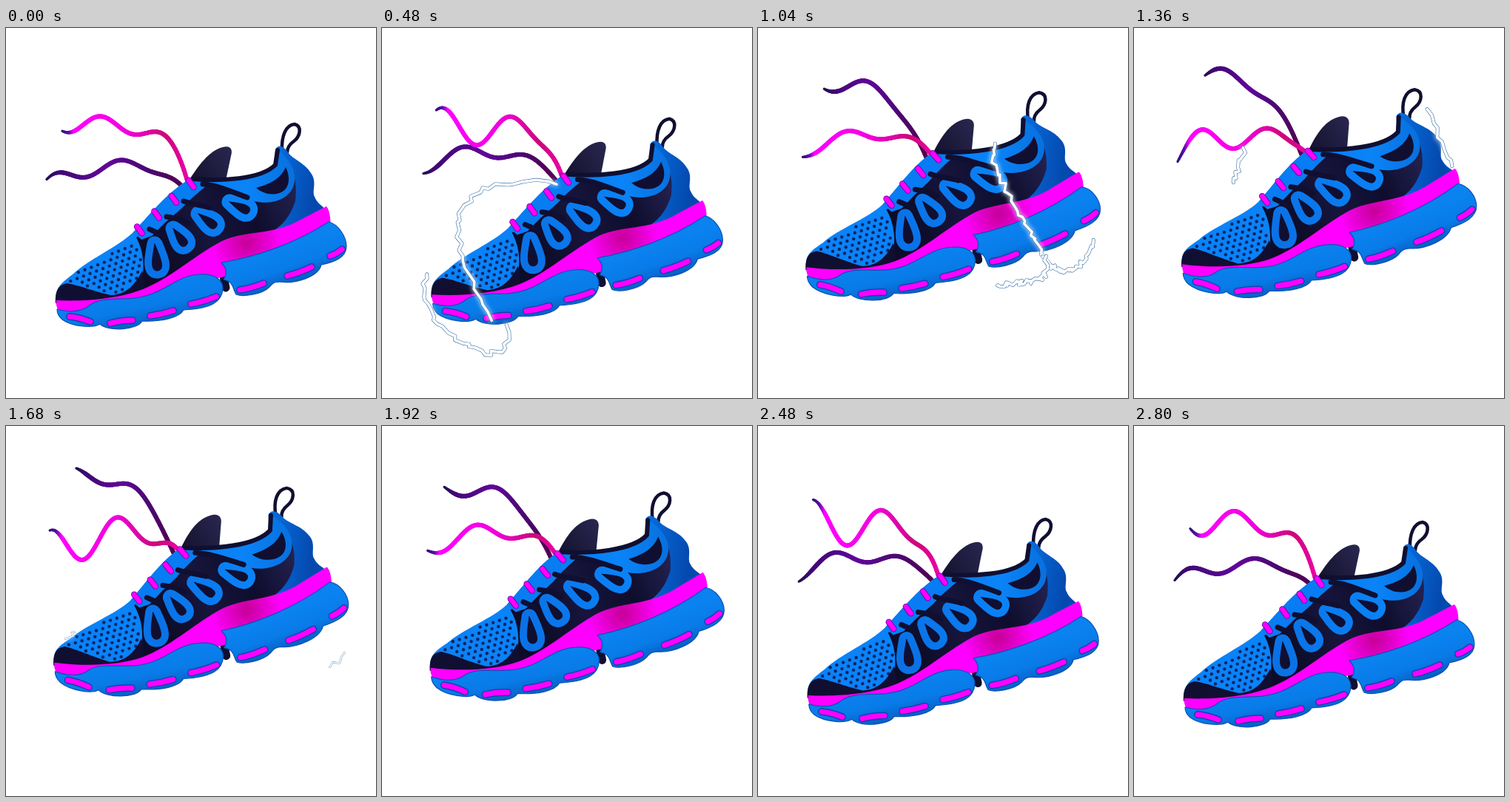
An HTML page with a canvas for the animation above (2880 ms loop, 500 by 500 pixels).

```html
<!DOCTYPE html>
<html lang="en">
<head>
<meta charset="utf-8">
<title>Sneaker</title>
<style>
  html, body { margin: 0; height: 100%; overflow: hidden; background: #fff; }
  canvas { display: block; }
</style>
</head>
<body>
<canvas id="stage" width="500" height="500"></canvas>
<script>
const ctx = document.getElementById('stage').getContext('2d');
const LOOP = 2880, STEP = 80, TAU = Math.PI * 2;
const NAVY = '#100f31', BLUE = '#087cf2', PINK = '#ff00ff';
ctx.lineCap = ctx.lineJoin = 'round';

let lift = 0;

// The shoe rises, leans back at the top and flexes at both ends.
function warp(x, y) {
  const lean = Math.max(0, (350 - y) / 190) ** 2 * (1 - Math.abs(x - 250) / 260);
  return [
    x + lift * (0.015 * (x - 250) - 21 * lean),
    y - lift * (40 + 12 * ((x - 240) / 200) ** 2)
  ];
}
const shape = d => new Path2D(d.replace(/([\d.]+),([\d.]+)/g, (_, x, y) => warp(+x, +y).join()));

function gradient(x0, y0, x1, y1, ...colors) {
  const g = ctx.createLinearGradient(...warp(x0, y0), ...warp(x1, y1));
  colors.forEach((c, i) => g.addColorStop(i / (colors.length - 1), c));
  return g;
}
function fill(d, color) {
  ctx.fillStyle = color;
  ctx.fill(shape(d));
}
function line(d, color, width) {
  ctx.strokeStyle = color;
  ctx.lineWidth = width;
  ctx.stroke(shape(d));
}

// A wave runs along the lace towards its tip, three lengths per loop.
function lace({ end, tipX, base, tilt, size, power, crest, stops }, theta) {
  const [ex, ey] = warp(...end);
  const g = ctx.createLinearGradient(tipX, 0, ex, 0);
  stops.forEach(([at, color]) => g.addColorStop(at, color));
  ctx.strokeStyle = g;
  let last;
  for (let i = 0; i <= 90; i++) {
    const u = i / 90, x = tipX + (ex - tipX) * u;
    const wave = size * (1 - u * u) * Math.cos(TAU * (x - crest) / 95 + 3 * theta);
    const y = base + tilt * (1 - u) ** 4 + (ey - base) * u ** power - wave;
    if (last) {
      ctx.lineWidth = 3 + 3 * Math.min(1, u * 9);
      ctx.beginPath();
      ctx.moveTo(...last);
      ctx.lineTo(x, y);
      ctx.stroke();
    }
    last = [x, y];
  }
}
function laces(theta) {
  lace({
    end: [238, 214], tipX: 55 + 41 * lift ** 2, base: 184 - 119 * lift,
    tilt: 30 * (1 - lift) ** 2, size: 11, power: 6 - 3 * lift, crest: 158,
    stops: [[0, '#22104f'], [0.08, '#3f0873'], [0.45, '#60069a'], [0.75, '#4a0870'], [1, '#54004f']]
  }, theta);
  lace({
    end: [246, 210], tipX: 76 - 17 * lift, base: 134 + 10 * lift,
    tilt: 36 * lift - 8, size: 20 + 12 * Math.cos(3 * theta - 4.2), power: 8, crest: 129,
    stops: [[0, '#32107a'], [0.05, '#5a0caa'], [0.09, PINK], [0.5, '#f200e0'], [0.82, '#cc0878'], [1, '#ec00a8']]
  }, theta);
}

// Navy teardrop with a blue rim, from its point to its round end
function drop(x, y, ex, ey, width) {
  const dx = ex - x, dy = ey - y, k = width / Math.hypot(dx, dy);
  const side = (p, s) => [x + dx * p - s * dy * k, y + dy * p + s * dx * k].join();
  const d = `M${x},${y} C${side(0.5, 0.5)} ${side(1, 1)} ${ex},${ey} C${side(1, -1)} ${side(0.5, -0.5)} ${x},${y}Z`;
  line(d, gradient(200, 300, 340, 220, '#0a72e6', '#0a84f8'), 21);
  fill(d, NAVY);
  line(d, NAVY, 1);
}

function dots() {
  const mesh = shape('M80,344 C105,320 150,302 174,287 C183,300 184,318 178,338 C168,352 152,359 138,358 C118,353 98,346 80,344Z');
  ctx.fillStyle = '#0b2560';
  for (let row = -8; row < 9; row++) {
    for (let col = -9; col < 10; col++) {
      const a = (col + (row & 1) / 2) * 9.4, b = row * 7.2;
      const [x, y] = warp(138 + a * 0.93 + b * 0.36, 330 - a * 0.36 + b * 0.93);
      if (!ctx.isPointInPath(mesh, x, y)) continue;
      ctx.beginPath();
      ctx.arc(x, y, 2.2, 0, TAU);
      ctx.fill();
    }
  }
}

function upper() {
  fill('M68,372 C65,352 73,346 90,333 C112,312 150,297 172,276 C196,250 222,218 252,202 C290,208 345,206 363,184 L364,164 C368,156 376,160 381,168 C388,178 404,182 412,196 C421,208 413,220 417,228 C421,238 428,240 432,246 L300,330 L180,372Z',
    gradient(240, 230, 410, 260, '#0a82f8', BLUE, '#0449ae'));
  fill('M176,283 C184,280 190,268 200,262 L232,232 L262,206 C300,214 350,212 366,190 L370,170 C386,182 395,206 391,234 C384,256 372,268 358,276 C330,278 300,282 285,292 C258,308 235,325 215,340 L180,358 C188,330 188,305 176,283Z',
    gradient(210, 300, 390, 220, '#0d0c28', '#17153c', '#0e0d2d', '#23214f'));
  fill('M172,276 C196,250 222,218 252,202 L278,207 C264,219 250,230 237,244 L215,263 L197,281 L183,286Z', BLUE);
  fill('M252,204 C300,212 345,206 366,186 L369,166 C388,182 394,200 388,215 C380,234 355,239 335,234 C315,228 300,216 262,208Z',
    gradient(260, 210, 390, 210, BLUE, '#0a84f8', '#0870de'));
  fill('M338,216 C360,210 372,202 378,188 C386,205 382,221 366,224 C354,226 345,222 338,216Z', NAVY);
  line('M253,204 C290,207 344,205 364,185 L367,165', NAVY, 6);

  drop(201, 292, 205, 328, 11);
  drop(226, 271, 243, 294, 10);
  drop(260, 251, 284, 269, 10);
  drop(302, 235, 329, 248, 10);
  line('M266,211 C284,212 302,220 326,229', NAVY, 7);
  line('M240,234 C250,238 262,239 276,243', NAVY, 7);
  line('M217,255 C227,256 237,259 246,264', NAVY, 7);
  line('M194,272 C201,275 207,277 213,282', NAVY, 7);

  dots();
  fill('M67,372 C66,354 72,347 82,345 C98,347 118,356 142,361 C162,360 174,348 184,328 C188,340 187,350 184,358 L110,374Z', NAVY);
}

function sole() {
  line('M293,330 L297,351', NAVY, 11);
  const pink = ctx.createRadialGradient(...warp(325, 290), 2, ...warp(325, 290), 48);
  pink.addColorStop(0, '#c9009b');
  pink.addColorStop(1, PINK);
  fill('M68,368 C110,370 155,365 185,353 C222,338 250,311 288,290 C320,272 360,282 400,258 L433,241 Q440,250 438,275 L300,335 L286,338 L110,392 Q65,394 68,368Z', pink);

  const edge = '#0a50b6', shades = ['#0a82f0', '#087be8', '#0757bb'];
  const front = 'M69,380 C88,385 104,383 114,374 C136,360 166,372 198,359 C220,351 236,334 262,333 C282,332 293,340 293,352 C292,370 278,379 240,381 C234,392 210,397 184,396 C178,408 138,411 127,400 C118,406 90,404 76,394 Q69,388 69,380Z';
  fill(front, gradient(200, 345, 212, 402, ...shades));
  line(front, edge, 1.2);
  const heel = 'M291,317 C335,310 390,292 436,262 C449,265 460,282 460,295 C460,310 444,316 426,320 C422,336 392,346 371,343 C362,343 360,345 356,350 C346,360 320,364 311,360 C306,352 308,343 294,340 Q302,328 291,317Z';
  fill(heel, gradient(375, 298, 392, 348, ...shades));
  line(heel, edge, 1.2);
  [
    'M86,390 Q99,391 114,397', 'M141,399 Q156,395 171,395', 'M195,389 Q210,387 226,382',
    'M250,373 Q267,370 284,363', 'M316,354 Q331,352 348,345', 'M380,335 Q396,331 413,323',
    'M438,308 Q447,305 454,299'
  ].forEach(d => {
    line(d, '#0646ad', 10);
    line(d, PINK, 7.2);
  });
}

function eyelets() {
  for (let i = 0; i < 4; i++) {
    const x = 247 - 23.3 * i, y = 206 + 20.8 * i;
    const d = `M${x},${y} L${x + 6.5},${y + 9}`;
    line(d, '#6a0ba8', 8.5);
    line(d, PINK, 6.5);
  }
}

let seed = 5;
const jitter = () => (seed = seed * 16807 % 2147483647) / 2147483647 * 8 - 4;

// A jagged stroke along the cubic curve through four control points
function bolt(start, span, ...controls) {
  const points = [];
  let length = 0;
  for (let i = 0; i <= 30; i++) {
    const u = i / 30, v = 1 - u;
    const weights = [v ** 3, 3 * v * v * u, 3 * v * u * u, u ** 3];
    const at = axis => weights.reduce((sum, w, k) => sum + w * controls[k * 2 + axis], jitter());
    points.push([at(0), at(1)]);
    if (i) length += Math.hypot(points[i][0] - points[i - 1][0], points[i][1] - points[i - 1][1]);
  }
  return { start, span, length, path: new Path2D('M' + points.join('L')) };
}
const bolts = [
  bolt(240, 400, 240, 210, 60, 195, 90, 290, 148, 395),
  bolt(320, 320, 60, 332, 30, 400, 180, 490, 172, 404),
  bolt(560, 320, 332, 160, 200, 90, 220, 200, 255, 285),
  bolt(560, 320, 188, 290, 230, 310, 215, 360, 298, 368),
  bolt(560, 320, 133, 358, 170, 420, 260, 450, 247, 355),
  bolt(880, 320, 318, 155, 310, 200, 370, 270, 388, 312),
  bolt(880, 320, 388, 312, 400, 340, 445, 335, 455, 283),
  bolt(880, 320, 388, 312, 395, 360, 350, 335, 322, 350),
  bolt(1300, 400, 150, 165, 130, 220, 120, 260, 80, 288),
  bolt(1300, 400, 400, 112, 430, 200, 500, 280, 440, 327)
];

function lightning(t) {
  for (const { start, span, length, path } of bolts) {
    const p = (t - start) / span;
    if (p <= 0 || p >= 1) continue;
    const head = Math.min(1, p / 0.45), tail = Math.max(0, (p - 0.6) / 0.4);
    const scale = 1 - tail * 0.6;
    const trace = (color, width) => {
      ctx.strokeStyle = color;
      ctx.lineWidth = width * scale;
      ctx.stroke(path);
    };
    ctx.save();
    ctx.setLineDash([(head - tail) * length, length * 2]);
    ctx.lineDashOffset = -tail * length;
    ctx.shadowColor = '#fff';
    ctx.shadowBlur = 6;
    trace('#fff', 4);
    ctx.shadowBlur = 0;
    trace('#386fa5', 4.8);
    trace('#fff', 3.6);
    ctx.restore();
  }
}

function draw(now) {
  const t = Math.floor(now % LOOP / STEP) * STEP, theta = TAU * t / LOOP;
  const swing = (1 - Math.cos(theta)) / 2;
  lift = swing * swing * (3 - 2 * swing);

  ctx.fillStyle = '#fff';
  ctx.fillRect(0, 0, 500, 500);
  line('M373,166 C372,146 378,131 390,130 C401,133 397,147 389,153 C382,158 380,164 380,168', NAVY, 4.5);
  fill('M246,208 C260,186 274,166 293,161 C303,158 307,164 304,173 L297,206Z',
    gradient(250, 200, 304, 165, '#15132f', '#29264f'));
  laces(theta);
  upper();
  sole();
  eyelets();
  lightning(t);
}

const begin = performance.now();
function frame() {
  draw(performance.now() - begin);
  requestAnimationFrame(frame);
}
frame();
</script>
</body>
</html>
```
